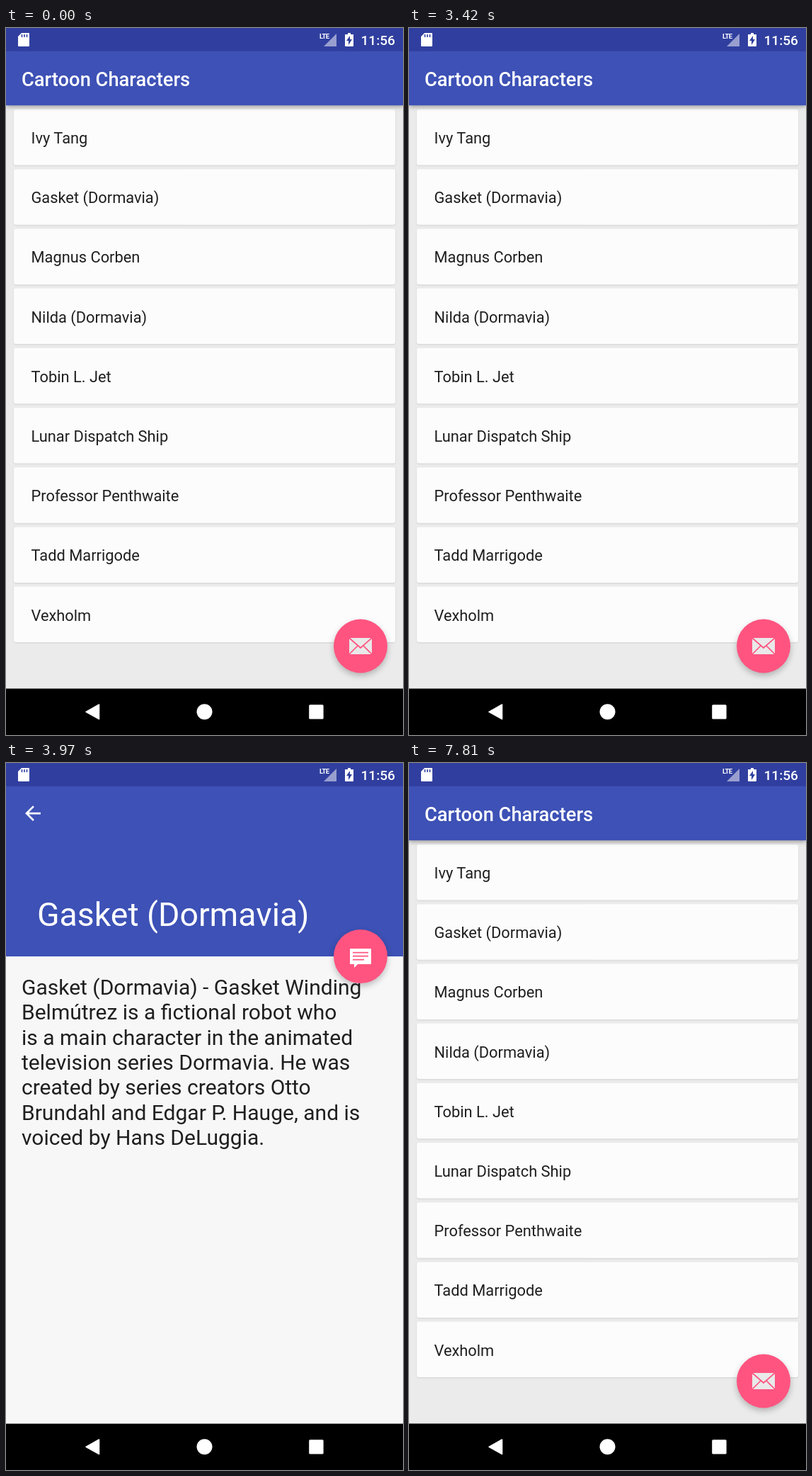
Write an HTML page that moves like this. It is 561x998 px and loops after 7.99 s.

```html
<!DOCTYPE html>
<html lang="en">
<head>
<meta charset="utf-8">
<style>
  html, body { margin: 0; width: 561px; height: 998px; overflow: hidden; }
  svg { display: block; font-family: Roboto, sans-serif; }
  .card { fill: #fcfcfd; filter: drop-shadow(0 1px 1px rgba(0, 0, 0, .1)); }
  .bar { fill: #3d51b6; }
  .status { fill: #303f9f; }
  .raised { filter: drop-shadow(0 2px 3px rgba(0, 0, 0, .35)); }
  .fab { fill: #ff5480; filter: drop-shadow(0 4px 4px rgba(0, 0, 0, .24)); }
  .line { fill: none; stroke: #ff5480; stroke-width: 1.7; }
  .white { fill: #fff; }
  .text { fill: #1f1f20; }
  .network { font-size: 9.5px; font-weight: 700; font-stretch: 75%; letter-spacing: -.7px; }
</style>
</head>
<body>
<svg width="561" height="998" viewBox="0 0 561 998">
  <clipPath id="listArea"><rect y="109" width="561" height="824"/></clipPath>

  <g id="listScreen">
    <rect width="561" height="998" fill="#ebebeb"/>
    <g id="cards" class="text" font-size="21.84"></g>
    <g clip-path="url(#listArea)"><ellipse id="glow" cx="310" rx="841" fill="#3f51b5"/></g>
    <rect class="bar raised" y="32" width="561" height="77.2"/>
    <rect class="status" width="561" height="32.75"/>
    <text class="white" x="22" y="81.5" font-size="27.3" font-weight="500">Cartoon Characters</text>
    <circle class="fab" cx="501" cy="872.5" r="38"/>
    <rect x="485" y="861" width="32" height="23" rx="1" fill="#e9e9e9"/>
    <path class="line" d="M485 861l16 14 16-14M485 884l12-12M517 884l-12-12"/>
    <rect y="932.5" width="561" height="65.5"/>
  </g>

  <g id="detailScreen">
    <rect width="561" height="998" fill="#f7f7f8"/>
    <rect class="bar" width="561" height="272.9"/>
    <rect class="status" width="561" height="32.75"/>
    <path class="white" transform="translate(21.6 54.6) scale(1.365)"
      d="M20 11H7.83l5.59-5.59L12 4l-8 8 8 8 1.41-1.41L7.83 13H20z"/>
    <text class="white" x="44" y="230" font-size="46.4">Gasket (Dormavia)</text>
    <g id="story" class="text" font-size="30.03"></g>
    <circle class="fab" cx="501" cy="273" r="38"/>
    <path class="white" d="M487 262h28q1 0 1 1v20q0 1-1 1h-18l-5 5v-5h-5q-1 0-1-1v-20q0-1 1-1z"/>
    <path class="line" d="M490 267.5h22M490 272.5h22M490 277.5h16"/>
    <rect y="932.5" width="561" height="65.5"/>
  </g>

  <g class="white">
    <rect id="ripple" y="932.5" height="65.5" rx="32.7"/>
    <path d="M22 7h10q1 0 1 1v17q0 1-1 1H18q-1 0-1-1V12z"/>
    <path d="M22.5 9v4M26 9v4M29.5 9v4" stroke="#303f9f" stroke-width="1.6"/>
    <path d="M467 8v18h-18z" opacity=".5"/>
    <rect class="status" x="442" y="6" width="15" height="11"/>
    <text class="network" x="443" y="15">LTE</text>
    <path d="M483 7h4v2h4v16q0 1-1 1h-10q-1 0-1-1V9h4z"/>
    <path class="status" d="M486 11v5h3l-5 8v-6h-3z"/>
    <text x="501.5" y="24" font-size="19.1" font-weight="500">11:56</text>
    <path d="M113 965.3L131.500 955v20.600z" stroke="#fff" stroke-width="1.5" stroke-linejoin="round"/>
    <circle cx="280.5" cy="965.3" r="11"/>
    <rect x="428.200" y="955.200" width="20.400" height="20.400" rx="1.5"/>
  </g>
</svg>
<script>
const $ = id => document.getElementById(id);
const set = (id, attrs) => {
  for (const name in attrs) $(id).setAttribute(name, attrs[name]);
};
const clamp = x => Math.min(1, Math.max(0, x));
const progress = (t, start, duration) => clamp((t - start) / duration);

const names = ['Ivy Tang', 'Gasket (Dormavia)', 'Magnus Corben', 'Nilda (Dormavia)', 'Tobin L. Jet',
  'Lunar Dispatch Ship', 'Professor Penthwaite', 'Tadd Marrigode', 'Vexholm'];
const story = ['Gasket (Dormavia) - Gasket Winding', 'Belmútrez is a fictional robot who',
  'is a main character in the animated', 'television series Dormavia. He was',
  'created by series creators Otto', 'Brundahl and Edgar P. Hauge, and is', 'voiced by Hans DeLuggia.'];

$('cards').innerHTML = names.map((name, i) => {
  const y = 115 + i * 84.2;
  return `<rect class="card" x="11" y="${y}" width="539" height="78.5" rx="3"/>
    <text x="35.5" y="${y + 48}">${name}</text>`;
}).join('');
$('story').innerHTML = story.map((line, i) => `<text x="22" y="${327 + i * 35.3}">${line}</text>`).join('');

const LOOP = 7990, STEP = 182.67;
const OPEN = 3716, CLOSE = 6606, PRESS = 6100, RELEASE = 6590;

const snap = t => t < 494 ? 0 : 500 + STEP * Math.floor((t - 494) / STEP);

function drawGlow(t) {
  const pull = Math.sqrt(progress(t, 800, 780));
  const strength = t < 1590 ? pull : (1 - progress(t, 1594, 685)) ** 2;
  const scale = .67 * strength;
  set('glow', { cy: 109 - 728 * scale, ry: 841 * scale, opacity: t < 2140 ? .09 * strength : 0 });
}

function drawDetail(t) {
  let shift, alpha;
  if (t < CLOSE) {
    shift = (1 - progress(t, OPEN, 350)) ** 5;
    alpha = 1 - (1 - progress(t, OPEN, 200)) ** 4;
  } else {
    shift = progress(t, CLOSE, 250) ** 4;
    alpha = 1 - progress(t, CLOSE + 100, 150);
  }
  set('detailScreen', { transform: `translate(0 ${80 * shift})`, opacity: alpha });
}

function drawRipple(t) {
  const width = 147 * (1 - 400 ** (-1.4 * progress(t, PRESS, 350)));
  const alpha = t < PRESS ? 0 : .2 * (1 - progress(t, RELEASE, 300)) ** 2;
  set('ripple', { x: 122.5 - width / 2, width, opacity: alpha });
}

function draw(now) {
  const t = snap(now % LOOP);
  drawGlow(t);
  drawDetail(t);
  drawRipple(t);
  requestAnimationFrame(() => draw(performance.now() - start));
}
const start = performance.now();
draw(0);
</script>
</body>
</html>
```
